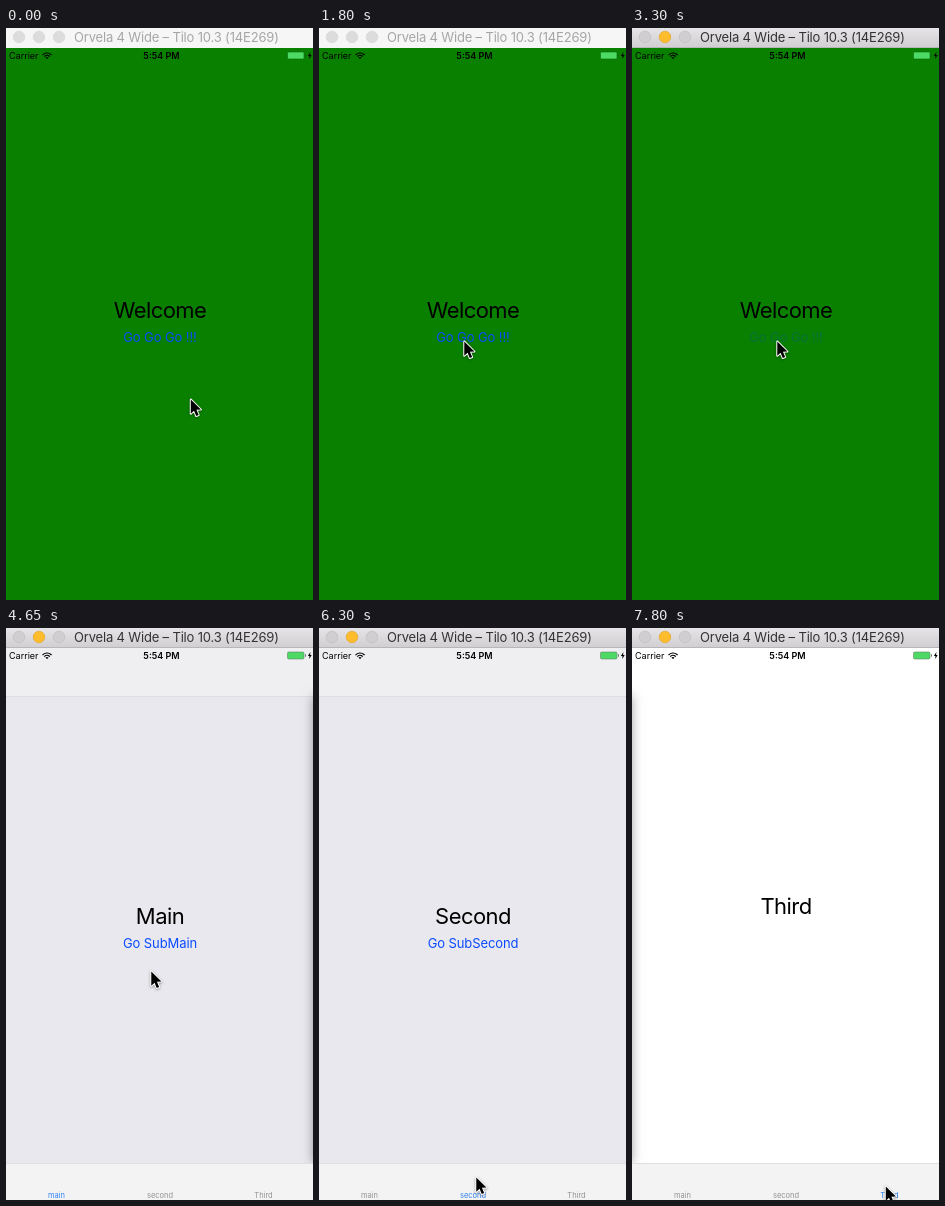
An HTML page with a canvas for the animation above (8000 ms loop, 307 px wide and 572 px high).

```html
<!DOCTYPE html>
<html lang="en">
<head>
<meta charset="utf-8">
<title>Tab demo</title>
<style>
html, body { margin: 0; width: 100%; height: 100%; overflow: hidden; }
canvas { display: block; }
</style>
</head>
<body>
<canvas id="stage" width="307" height="572"></canvas>
<script>
const ctx = document.getElementById('stage').getContext('2d');
const W = 307, H = 572, BAR_Y = 535;
const LOOP = 8000, STEP = 150;
const BLUE = '#0a4bff';
const PRESS = 3300, MAIN = 3450, SECOND = 6300, THIRD = 7800;

// Each glide starts where the previous one ended.
const GLIDES = [
  { from: 675, to: 1275, x: 139, y: 283 },
  { from: 1350, to: 1650, x: 145, y: 313 },
  { from: 4500, to: 4650, x: 145, y: 343 },
  { from: 4650, to: 4800, x: 142, y: 516 },
  { from: 5100, to: 5250, x: 157, y: 549 },
  { from: 6450, to: 7050, x: 253.5, y: 558 }
];

const easeOut = p => 1 - (1 - p) ** 2;
const lerp = (a, b, p) => a + (b - a) * p;

function rect(x, y, w, h, color) {
  ctx.fillStyle = color;
  ctx.fillRect(x, y, w, h);
}

function polygon(points) {
  ctx.beginPath();
  points.forEach(([x, y]) => ctx.lineTo(x, y));
  ctx.closePath();
}

function text(str, x, y, size, color, { align = 'center', weight = 400, track = 0 } = {}) {
  ctx.font = `${weight} ${size}px Inter, Roboto, sans-serif`;
  ctx.letterSpacing = `${track}px`;
  ctx.textAlign = align;
  ctx.fillStyle = color;
  ctx.fillText(str, x, y);
}

function titleFill() {
  const g = ctx.createLinearGradient(0, 0, 0, 20);
  g.addColorStop(0, '#e6e4e6');
  g.addColorStop(1, '#d0ced0');
  return g;
}

function titleBar(active) {
  rect(0, 0, W, 20, active ? titleFill() : '#f6f6f6');
  if (active) rect(0, 19, W, 1, '#b8b6b8');
  for (let i = 0; i < 3; i++) {
    const lit = active && i === 1;
    ctx.beginPath();
    ctx.arc(13 + 20 * i, 9, 5.8, 0, Math.PI * 2);
    ctx.fillStyle = lit ? '#ffbd2e' : active ? '#d0ced0' : '#dcdcdc';
    ctx.fill();
    ctx.lineWidth = 0.6;
    ctx.strokeStyle = lit ? '#dfa023' : active ? '#bdbbbd' : '#d4d4d4';
    ctx.stroke();
  }
  text('Orvela 4 Wide – Tilo 10.3 (14E269)', 68, 14, 13, active ? '#333' : '#a6a6a6',
    { align: 'left', track: -0.17 });
}

function wifi(x, y) {
  const fan = r => ctx.arc(x, y, r, -Math.PI * 0.77, -Math.PI * 0.23);
  ctx.strokeStyle = ctx.fillStyle = '#000';
  ctx.lineWidth = 1.2;
  for (const r of [3.6, 6]) {
    ctx.beginPath();
    fan(r);
    ctx.stroke();
  }
  ctx.beginPath();
  ctx.moveTo(x, y);
  fan(2);
  ctx.fill();
}

function bolt(x, y) {
  const half = [[0.6, -3.5], [-1.9, 0.5], [-0.3, 0.5]];
  polygon([...half, ...half.map(([dx, dy]) => [-dx, -dy])].map(([dx, dy]) => [x + dx, y + dy]));
  ctx.fillStyle = '#000';
  ctx.fill();
}

function battery(x, y, edge) {
  ctx.beginPath();
  ctx.roundRect(x, y, 16.5, 7, 1.3);
  ctx.fillStyle = '#4cd964';
  ctx.fill();
  ctx.lineWidth = 0.6;
  ctx.strokeStyle = edge;
  ctx.stroke();
  rect(x + 17.5, y + 2.3, 1, 2.4, edge);
}

function statusBar(onGreen) {
  text('Carrier', 3, 31, 9, '#000', { align: 'left' });
  wifi(41, 31);
  text('5:54 PM', 155.5, 31, 9, '#000', { weight: 600 });
  battery(281.5, 24, onGreen ? '#0a6a10' : '#66806c');
  bolt(303.8, 27.5);
}

function heading(str, y) {
  text(str, 154, y, 22, '#000', { track: -0.55 });
}

function link(str, y, color = BLUE) {
  text(str, 154, y, 13, color, { track: -0.1 });
}

function welcome(pressed) {
  rect(0, 20, W, H - 20, '#0a8000');
  heading('Welcome', 290);
  link('Go Go Go !!!', 314, pressed ? '#08703a' : BLUE);
}

function tabPage(name) {
  rect(0, 20, W, 48, '#efeff1');
  rect(0, 68, W, 1, '#dedee2');
  rect(0, 69, W, BAR_Y - 69, '#e8e8ee');
  heading(name, 295.5);
  link('Go Sub' + name, 320);
}

// Shadow cast by a neighbouring page just off the stage.
function edgeShadow(x) {
  ctx.save();
  ctx.shadowColor = 'rgba(0,0,0,0.36)';
  ctx.shadowBlur = 10;
  rect(x, 68, 40, BAR_Y - 68, '#fff');
  ctx.restore();
}

function thirdPage() {
  rect(0, 20, W, BAR_Y - 20, '#fff');
  edgeShadow(-40);
  heading('Third', 286);
}

function tabBar(selected) {
  rect(0, BAR_Y, W, H - BAR_Y, '#f3f3f3');
  rect(0, BAR_Y, W, 1, '#dfdfe1');
  ['main', 'second', 'Third'].forEach((label, i) =>
    text(label, 50.5 + 103.5 * i, 569.5, 7.5, i === selected ? '#2f80f5' : '#929292'));
}

function pointerAt(t) {
  let x = 184.5, y = 371;
  for (const g of GLIDES) {
    if (t <= g.from) break;
    const p = easeOut(Math.min(1, (t - g.from) / (g.to - g.from)));
    x = lerp(x, g.x, p);
    y = lerp(y, g.y, p);
  }
  return [x, y];
}

function pointer(t) {
  if (t >= 4950 && t < 5250) return;
  const [x, y] = pointerAt(t);
  const side = [[5.5, 13.2], [1.3, 11.6], [1.3, 17.4]];
  const mirror = side.map(([dx, dy]) => [-dx, dy]).reverse();
  ctx.save();
  ctx.translate(x + 0.3, y + 0.5);
  ctx.rotate(-Math.PI / 8);
  polygon([[0, 0], ...side, ...mirror]);
  ctx.lineJoin = 'round';
  ctx.lineWidth = 2;
  ctx.strokeStyle = '#fff';
  ctx.shadowColor = 'rgba(0,0,0,0.4)';
  ctx.shadowBlur = 2.5;
  ctx.shadowOffsetY = 0.8;
  ctx.stroke();
  ctx.shadowColor = 'transparent';
  ctx.fillStyle = '#000';
  ctx.fill();
  ctx.restore();
}

function draw(t) {
  const onGreen = t < MAIN;
  if (onGreen) {
    welcome(t >= PRESS);
  } else {
    const tab = t < SECOND ? 0 : t < THIRD ? 1 : 2;
    if (tab === 2) thirdPage();
    else tabPage(['Main', 'Second'][tab]);
    if (tab === 0) edgeShadow(W);
    tabBar(tab);
  }
  titleBar(t >= PRESS);
  statusBar(onGreen);
  pointer(t);
}

const start = performance.now();
function tick() {
  const t = (performance.now() - start) % LOOP;
  draw(Math.floor(t / STEP) * STEP);
  requestAnimationFrame(tick);
}
tick();
</script>
</body>
</html>
```
